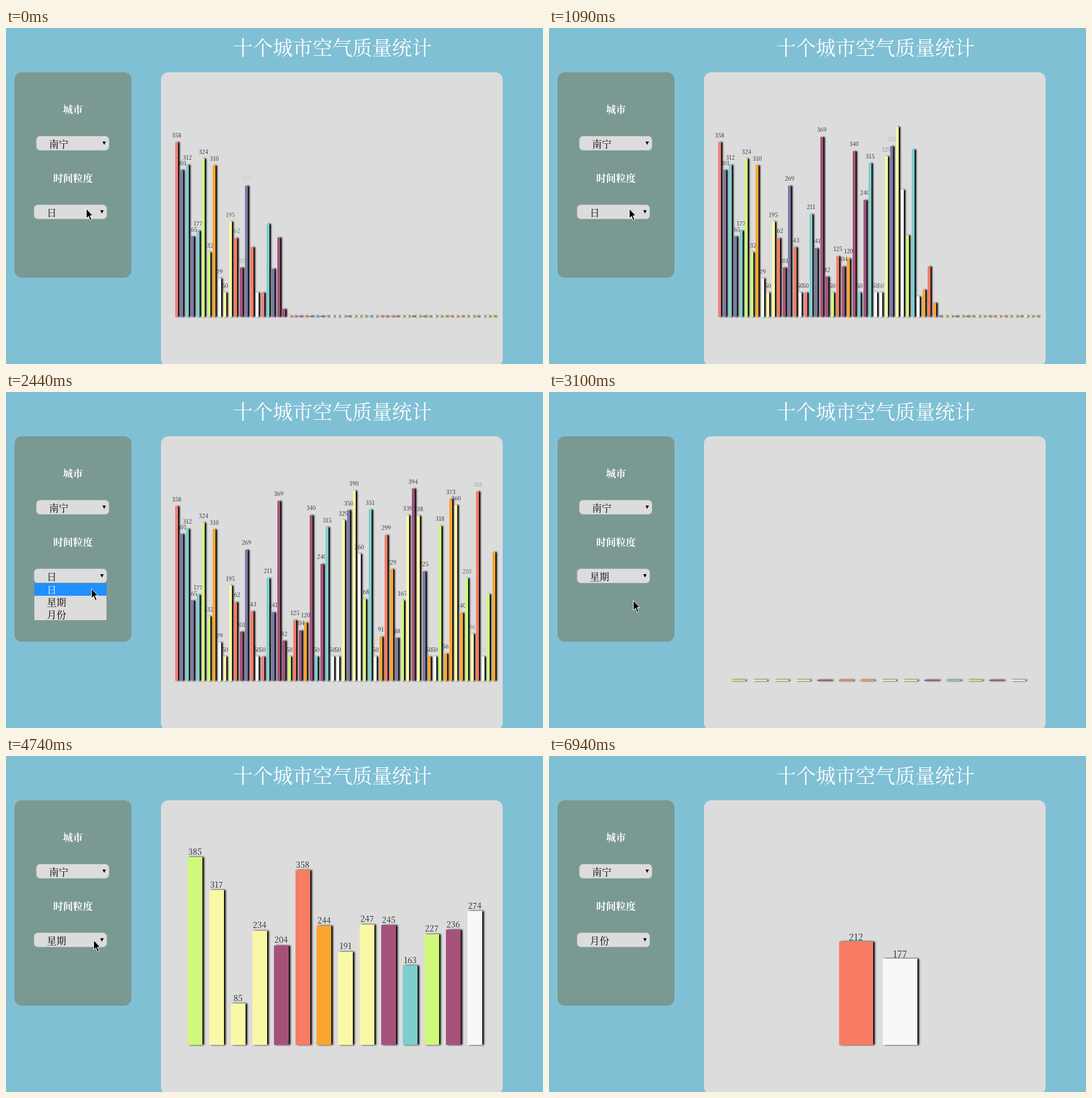
An HTML page for the animation above (8.18 s loop, 946x592 px).

```html
<!DOCTYPE html>
<html lang="zh-CN">
<head>
<meta charset="utf-8">
<title>空气质量统计</title>
<style>
  html, body { margin: 0; width: 100%; height: 100%; overflow: hidden; }
  body { background: #80c0d5; }
  #stage {
    position: relative; width: 946px; height: 592px; overflow: hidden;
    font-family: "Noto Serif CJK SC", "Noto Serif", "Noto Sans CJK SC", "Noto Sans CJK", serif;
  }
  #stage div, #stage svg, h1, h2 { position: absolute; box-sizing: border-box; margin: 0; white-space: nowrap; }
  h1 { left: 400px; top: 8px; font-size: 35px; line-height: 50px; font-weight: 300; color: #fff; }
  h2 { left: 0; width: 206px; font-size: 17.4px; line-height: 24px; text-align: center; color: #fff; }
  .panel { border-radius: 13px; }
  .side { left: 15px; top: 78px; width: 206px; height: 362px; background: #7a9993; }
  .board { left: 273px; top: 78px; width: 602px; height: 518px; background: #dcdcdc; }
  .select {
    width: 129px; height: 26px; border-radius: 7px; padding-left: 22px;
    background: #dcdcdc; border: 1px solid #b4bab8;
    font-size: 17px; line-height: 25px; color: #000;
  }
  .select::after {
    content: ""; position: absolute; right: 5px; top: 9px;
    border: 3px solid transparent; border-top: 6px solid #000; border-bottom: 0;
  }
  #menu { left: 49px; top: 336px; width: 129px; height: 67px; background: #dcdcdc; border: 1px solid #8a9290; }
  #menu div { left: 0; width: 127px; height: 22px; padding-left: 22px; font-size: 17px; line-height: 22px; }
  #menu .on { background: #1e90ff; color: #fff; }
  .bar { bottom: 83px; box-shadow: 3px 0 3px #000; }
  .label { line-height: 1; color: #222; transform: translateX(-50%); }
  #cursor { left: 0; top: 0; overflow: visible; }
</style>
</head>
<body>
<div id="stage">
  <h1>十个城市空气质量统计</h1>
  <div class="panel side">
    <h2 style="top:53px">城市</h2>
    <h2 style="top:174px">时间粒度</h2>
  </div>
  <div class="panel board"></div>
  <div class="select" style="left:53px;top:190px">南宁</div>
  <div class="select" style="left:49px;top:311px" id="unit">日</div>
  <div id="charts"></div>
  <div id="menu"></div>
  <svg id="cursor" width="26" height="24">
    <path d="M.5.5V17.5L4.4 13.8 7.2 21 10 19.8 7 12.8H12Z" fill="#000" stroke="#fff"/>
    <g id="busy">
      <path d="M13 3h10v16H13Z" fill="#fff"/>
      <path d="M14 4.5h8M14 17.5h8M15.5 5v3l5 6v3M20.5 5v3l-5 6v3" fill="none" stroke="#000"/>
      <path d="M16 7h4l-2 3ZM18 12l2.5 5h-5Z"/>
    </g>
  </svg>
</div>
<script>
const LOOP = 8180, BASE = 509, SCALE = 0.86;
const STAGGER = 55.5, GROW = 330, FADE_AT = 460, FADE = 250;
const UNITS = ['日', '星期', '月份'];
const COLORS = {
  p: '#f27f7c', c: '#f87c63', s: '#7a7aa5', t: '#7ecece', l: '#d0f87b',
  o: '#f9a62e', w: '#f8f8f8', y: '#f9f8a6', m: '#a5527b'
};

// The screen refreshes only at these moments
const TICKS = [
  0, 150, 330, 460, 580, 700, 850, 970, 1090, 1240, 1390, 1510, 1630, 1750, 1870, 2020,
  2170, 2290, 2440, 2590, 2710, 2830, 2980, 3100, 3250, 3370, 3490, 3650, 3800, 3920,
  4040, 4200, 4320, 4470, 4590, 4740, 5010, 5160, 5280, 5430, 5730, 6010, 6140, 6280,
  6400, 6520, 6670, 6790, 6940
];

const CHARTS = [
  { from: 0, to: 3100, start: -1207, x: 298, pitch: 9.47, width: 5, size: 10, gap: 7.5,
    data: '358p 301s 312t 165s 177t 324l 132l 310o 79w 50y 195y 162c 101m 269s 143c ' +
          '50w 50p 211t 141s 369m 82m 50l 125c 104m 120o 340m 50t 240m 315t 50w ' +
          '50w 329y 350s 390y 260w 168l 351t 50w 91o 299c 229o 88s 165l 339y 394m ' +
          '338y 225s 50o 50w 318l 56o 373o 360y 140o 210l 96y 388c 50w 178l 264o' },
  { from: 3100, to: 5730, start: 3212, x: 320, pitch: 37.9, width: 26, size: 14.3, gap: 3,
    data: '385l 317y 85y 234y 204m 358c 244o 191y 247y 245m 163t 227l 236m 274w' },
  { from: 5730, to: LOOP, start: 5863, x: 510.5, pitch: 77.5, width: 60.5, size: 16, gap: 0,
    data: '212c 177w' }
];

// time, x, y
const CURSOR = [
  [0, 141, 318], [1240, 149, 323], [1390, 150, 325], [2440, 150, 346], [2590, 149, 360],
  [2830, 148, 367], [4200, 150, 355], [4320, 153, 343], [4470, 153, 340], [4590, 154, 337],
  [4740, 154, 324], [5160, 148, 360], [5280, 142, 378], [5430, 141, 384], [6790, 560, 409]
];

const $ = id => document.getElementById(id);
const clamp = v => Math.max(0, Math.min(1, v));
const swing = p => 0.5 - Math.cos(Math.PI * p) / 2;
const within = (t, a, b) => t >= a && t < b;
const show = (el, on) => { el.style.visibility = on ? 'visible' : 'hidden'; };

function add(parent, className, style, text = '') {
  const el = document.createElement('div');
  el.className = className;
  el.textContent = text;
  Object.assign(el.style, style);
  return parent.appendChild(el);
}

function build(chart) {
  chart.el = add($('charts'), '', { left: 0, top: 0, width: '946px', height: '592px' });
  chart.bars = chart.data.split(' ').map((item, i) => {
    const value = parseInt(item), height = value * SCALE;
    const x = chart.x + i * chart.pitch;
    const bar = add(chart.el, 'bar', {
      left: x + 'px', width: chart.width + 'px', background: COLORS[item.slice(-1)]
    });
    const label = add(chart.el, 'label', {
      left: x + chart.width / 2 + 'px', bottom: 592 - BASE + height + chart.gap + 'px',
      fontSize: chart.size + 'px'
    }, value);
    return { bar, label, height, start: chart.start + i * STAGGER };
  });
}

CHARTS.forEach(build);
const options = UNITS.map((name, i) => add($('menu'), '', { top: i * 22 + 'px' }, name));

function drawChart(chart, t) {
  const on = within(t, chart.from, chart.to);
  chart.el.style.display = on ? 'block' : 'none';
  if (!on) return;
  for (const { bar, label, height, start } of chart.bars) {
    const age = t - start;
    bar.style.height = Math.max(2, height * swing(clamp(age / GROW))) + 'px';
    label.style.opacity = clamp((age - FADE_AT) / FADE);
  }
}

function draw(t) {
  CHARTS.forEach(chart => drawChart(chart, t));

  $('unit').textContent = UNITS[t < 2980 ? 0 : t < 5730 ? 1 : 2];
  show($('menu'), within(t, 2020, 2980) || within(t, 5010, 5730));
  const row = t < 2590 ? 0 : t < 5430 ? 1 : 2;
  options.forEach((el, i) => { el.className = i === row ? 'on' : ''; });

  const [, x, y] = CURSOR.filter(p => p[0] <= t).pop();
  const visible = t < 6940;
  $('cursor').style.transform = `translate(${x}px, ${y}px)`;
  show($('cursor'), visible);
  show($('busy'), within(t, 5010, 5160) || within(t, 5730, 6790));
}

let last = -1;
function loop() {
  const now = performance.now() % LOOP;
  const t = TICKS.filter(tick => tick <= now).pop();
  if (t !== last) draw(last = t);
  requestAnimationFrame(loop);
}
loop();
</script>
</body>
</html>
```
